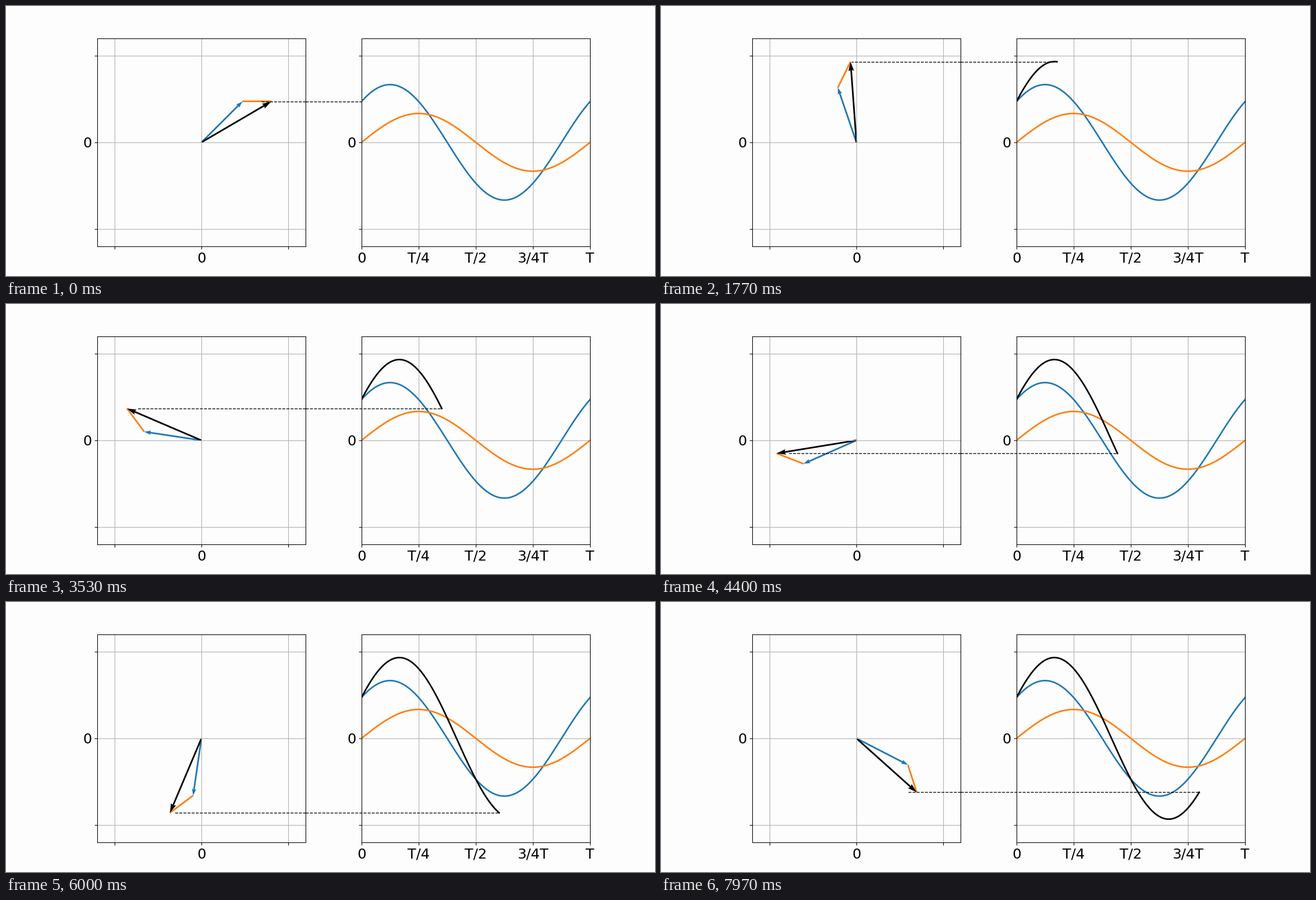
These frames come from a looping animation (1159x483 px, 8 s). A matplotlib script:

```python
import numpy as np
import matplotlib.pyplot as plt
from matplotlib.animation import FuncAnimation
from matplotlib.patches import Polygon

W, H, DPI = 1159, 483, 100
FRAMES, LOOP_MS, SAMPLES = 240, 8000, 300
LIM, TICK = 1.8, 1.5
BLUE, ORANGE, PAPER = "#1f77b4", "#ff7f0e", "#fdfdfd"

plt.rcParams.update({"font.family": "DejaVu Sans", "font.size": 18})

phase = np.linspace(0, 2 * np.pi, SAMPLES)
first = np.exp(1j * (phase + np.pi / 4))
second = 0.5 * np.exp(1j * phase)
total = first + second

fig, (left, right) = plt.subplots(1, 2, figsize=(W / DPI, H / DPI), dpi=DPI,
                                  facecolor=PAPER)
for ax in (left, right):
    ax.set_facecolor(PAPER)
    ax.set_ylim(-LIM, LIM)
    ax.set_yticks([-TICK, 0, TICK], ["", "0", ""])
    ax.grid(True)
left.set_xlim(-LIM, LIM)
left.set_xticks([-TICK, 0, TICK], ["", "0", ""])
left.set_aspect("equal")
left.set_zorder(1)  # keeps the dashed link above the right plot
right.set_xlim(0, 2 * np.pi)
right.set_xticks(np.arange(5) * np.pi / 2, ["0", "T/4", "T/2", "3/4T", "T"])

right.plot(phase, first.imag, color=BLUE, lw=2)
right.plot(phase, second.imag, color=ORANGE, lw=2)
trace, = right.plot([], [], color="black", lw=2)

# Right plot's extent in the left plot's units
left.apply_aspect()
inv = left.transData.inverted()
plot_x0, plot_x1 = (inv.transform(right.transAxes.transform((u, 0)))[0]
                    for u in (0, 1))


def dashed():
    line, = left.plot([], [], "--", color="black", lw=1, clip_on=False)
    return line


def patch(color):
    return left.add_patch(Polygon(np.zeros((3, 2)), closed=True, fc=color, lw=0))


def arrow(tail, vec, shaft=0.028, head_w=0.0, head_l=0.0):
    """Outline of an arrow in the complex plane as an N x 2 array."""
    size, s, h = abs(vec), shaft / 2, head_w / 2
    neck, barb = size - 0.9 * head_l, size - head_l
    if head_l:
        half = [0 + s * 1j, neck + s * 1j, barb + h * 1j]
        pts = half + [size] + list(np.conj(half[::-1]))
    else:
        pts = [s * 1j, size + s * 1j, size - s * 1j, -s * 1j]
    pts = tail + np.array(pts) * vec / size
    return np.column_stack([pts.real, pts.imag])


link_in, link_out = dashed(), dashed()
arm1, arm2, arm_sum = patch(BLUE), patch(ORANGE), patch("black")


def update(i):
    a, b, c = first[i], second[i], total[i]
    arm1.set_xy(arrow(0, a, head_w=0.075, head_l=0.115))
    arm2.set_xy(arrow(a, b))
    arm_sum.set_xy(arrow(0, c, head_w=0.095, head_l=0.16))

    start = c.real * (1 - 0.2 / abs(c))
    end = plot_x0 + (plot_x1 - plot_x0) * i / (SAMPLES - 1)
    link_in.set_data([LIM, start], [c.imag] * 2)
    link_out.set_data([LIM, end], [c.imag] * 2)
    trace.set_data(phase[:i + 1], total.imag[:i + 1])
    return link_in, link_out, arm1, arm2, arm_sum, trace


anim = FuncAnimation(fig, update, frames=FRAMES, interval=LOOP_MS / FRAMES,
                     repeat=True, repeat_delay=0, blit=False)
plt.show()
```
